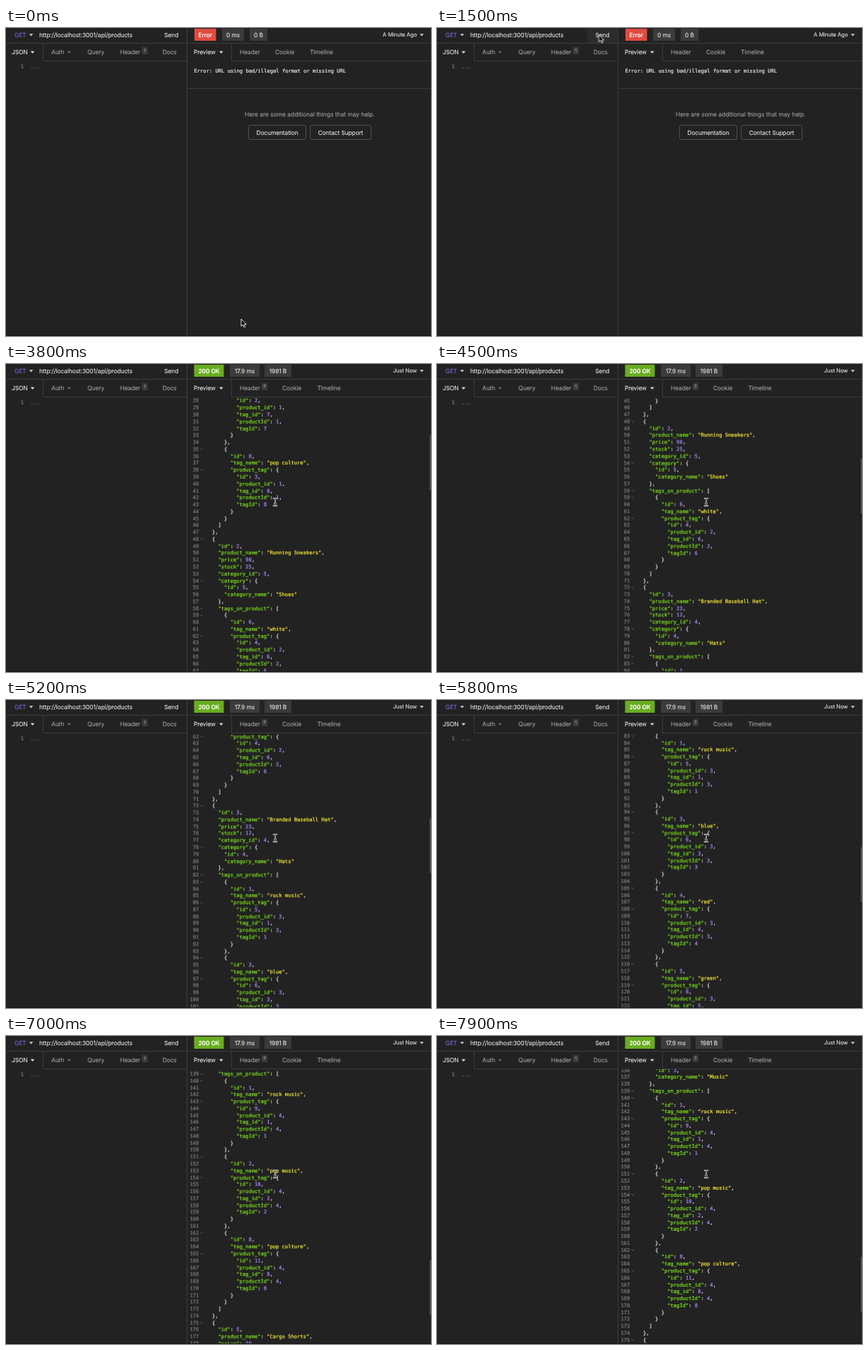
An HTML page that plays this animation: 600x435 px, repeating every 8000 ms.

```html
<!DOCTYPE html>
<html lang="en">
<head>
<meta charset="utf-8">
<title>API client</title>
<style>
  html, body { margin: 0; width: 100%; height: 100%; overflow: hidden; background: #222; }
  svg { display: block; width: 600px; height: 435px; }
  text {
    font: 8.4px Inter, "Open Sans", sans-serif;
    letter-spacing: -.01em;
    text-rendering: geometricPrecision;
    color: #e6e6e6;
  }
  /* a hairline stroke gives the text its slightly heavier smoothing */
  text, tspan { fill: currentColor; stroke: currentColor; stroke-width: .1px; }
  .mono, .mono text { font: 7.13px "DejaVu Sans Mono", "Liberation Mono", monospace; letter-spacing: 0; }
  .mono, .mono text, .mono tspan { stroke-width: .22px; }
  .dim { color: #a0a0a0; }
  .mid { text-anchor: middle; }
  .end { text-anchor: end; }
  .loose { letter-spacing: 0; }
  .strong { font-weight: 600; color: #fff; }
  .small { font-size: 7.7px; }
  .badge { font-size: 6px; color: #b0b0b0; }
  .pill { fill: #3b3b3b; }
  .line { fill: #3c3c3c; }
  .button { fill: none; stroke: #505050; }
  .num { color: #7c7c7c; }
  .key { color: #7fe31c; }
  .str { color: #fbec38; }
  .val { color: #a98dff; }
  .method { color: #7865d0; }

  #old, #new, #hover, #arrow, #beam { animation: 8s step-end infinite; }
  #old { animation-name: old; }
  #new { animation-name: new; }
  #hover { animation-name: hover; }
  #arrow { animation-name: arrow; }
  #beam { animation-name: beam; }
  #code { animation: scroll 8s linear infinite; }
  #thumb { animation: thumb 8s linear infinite; }
  #cursor { animation: move 8s ease-in-out infinite; }

  @keyframes old { 0% { opacity: 1 } 21.25% { opacity: .5 } 25%, 100% { opacity: 0 } }
  @keyframes new { 0% { opacity: 0 } 25%, 100% { opacity: 1 } }
  @keyframes hover { 0% { opacity: 0 } 10.5% { opacity: 1 } 35.5%, 100% { opacity: 0 } }
  @keyframes arrow { 0% { opacity: 1 } 37.5%, 100% { opacity: 0 } }
  @keyframes beam { 0% { opacity: 0 } 37.5%, 100% { opacity: 1 } }
  @keyframes move {
    0%, 1.5% { transform: translate(332px, 411px) }
    11.25%, 34.5% { transform: translate(228.5px, 9.5px) }
    40%, 100% { transform: translate(380px, 195px) }
  }
  @keyframes scroll {
    0%, 41% { transform: translateY(0) }
    47.5% { transform: translateY(-266px) }
    65% { transform: translateY(-598.3px) }
    80% { transform: translateY(-1010.3px) }
    87.5% { transform: translateY(-1349.3px) }
    98.75%, 100% { transform: translateY(-1325px) }
  }
  @keyframes thumb {
    0%, 41% { transform: translateY(0) }
    47.5% { transform: translateY(53.2px) }
    65% { transform: translateY(119.6px) }
    80% { transform: translateY(202px) }
    87.5% { transform: translateY(269.8px) }
    98.75%, 100% { transform: translateY(265px) }
  }
</style>
</head>
<body>
<svg viewBox="0 0 600 435">
  <defs>
    <path id="caret" d="M-2.8 -1.5H2.8L0 1.7Z"/>
    <path id="stem" d="M-2.3 -5.3Q0 -5.3 0 -3.6Q0 -5.3 2.3 -5.3M0 -3.6V3.6M-2.3 5.3Q0 5.3 0 3.6Q0 5.3 2.3 5.3M-1.2 1.6H1.2"/>
    <clipPath id="pane"><rect x="256" y="47" width="344" height="387"/></clipPath>
  </defs>
  <rect width="600" height="435" fill="#222"/>

  <!-- request pane -->
  <rect id="hover" x="212" width="43" height="21" fill="#2b2b2b"/>
  <text class="method" x="12" y="12.6">GET</text>
  <use href="#caret" x="35.5" y="9.7" fill="#ccc"/>
  <text x="47" y="12.6">http://localhost:3001/api/products</text>
  <text x="223.5" y="12.6">Send</text>
  <text x="8" y="37.2">JSON</text>
  <use href="#caret" x="37.5" y="34.2" fill="#ddd"/>
  <text class="dim" x="64" y="37.2">Auth</text>
  <use href="#caret" x="89" y="34.2" fill="#666"/>
  <text class="dim" x="115" y="37.2">Query</text>
  <text class="dim" x="161" y="37.2">Header</text>
  <rect class="pill" x="192" y="27" width="8" height="10" rx="1"/>
  <text class="badge mid" x="196" y="34.2">1</text>
  <text class="dim" x="221" y="37.2">Docs</text>
  <g class="mono">
    <text class="num end" x="25" y="56.7">1</text>
    <text class="num" x="34.5" y="56.7">...</text>
  </g>

  <!-- response pane -->
  <text x="265" y="37.2">Preview</text>
  <use href="#caret" x="303.8" y="34.2" fill="#ddd"/>
  <text class="dim" x="330" y="37.2">Header</text>
  <use href="#caret" x="587" y="9.7" fill="#ccc"/>

  <g id="old">
    <rect x="266" y="1" width="30.5" height="17" fill="#e14b40"/>
    <text class="strong mid" x="281.2" y="12.6" style="font-weight:500">Error</text>
    <rect class="pill" x="305" y="1" width="31" height="17"/>
    <text class="mid" x="320.5" y="12.6">0 ms</text>
    <rect class="pill" x="344" y="1" width="25" height="17"/>
    <text class="mid" x="356.5" y="12.6">0 B</text>
    <text class="small end" x="580" y="12.4">A Minute Ago</text>
    <text class="dim" x="380" y="37.2">Cookie</text>
    <text class="dim" x="429" y="37.2">Timeline</text>
    <text class="mono" x="265.5" y="63.2">Error: URL using bad/illegal format or missing URL</text>
    <rect class="line" x="256" y="85" width="344" height="1"/>
    <text class="dim mid loose" x="428.8" y="125.2">Here are some additional things that may help.</text>
    <rect class="button" x="342.5" y="137.5" width="81" height="20" rx="2"/>
    <text class="mid" x="383" y="151.2">Documentation</text>
    <rect class="button" x="429.5" y="137.5" width="86" height="20" rx="2"/>
    <text class="mid" x="472.3" y="151.2">Contact Support</text>
  </g>

  <g id="new">
    <rect x="265.5" y="1" width="42" height="17" fill="#69ad20"/>
    <text class="strong mid" x="286.5" y="12.6">200 OK</text>
    <rect class="pill" x="316" y="1" width="42" height="17"/>
    <text class="mid" x="337" y="12.6">17.9 ms</text>
    <rect class="pill" x="365" y="1" width="38" height="17"/>
    <text class="mid" x="384" y="12.6">1981 B</text>
    <text class="small end" x="580" y="12.4">Just Now</text>
    <rect class="pill" x="361" y="27" width="8" height="10" rx="1"/>
    <text class="badge mid" x="365" y="34.2">7</text>
    <text class="dim" x="390" y="37.2">Cookie</text>
    <text class="dim" x="439.5" y="37.2">Timeline</text>
    <g clip-path="url(#pane)"><g id="code" class="mono"></g></g>
    <rect id="thumb" x="598" y="47" width="2" height="77.5" fill="#4c4c4c"/>
  </g>

  <!-- borders -->
  <g class="line">
    <rect x="255" width="1" height="435"/>
    <rect y="21" width="600" height="1"/>
    <rect x="52" y="22" width="1" height="25"/>
    <rect x="52" y="46" width="203" height="1"/>
    <rect x="318" y="22" width="1" height="25"/>
    <rect x="318" y="46" width="282" height="1"/>
  </g>
  <rect y="434" width="600" height="1" fill="#151515"/>

  <g id="cursor">
    <path id="arrow" d="M0 0V10.2L2.4 8L4 11.6L5.7 10.9L4.2 7.4H7.2Z" fill="#000" stroke="#fff" stroke-width=".9"/>
    <g id="beam" fill="none" stroke-linecap="round">
      <use href="#stem" stroke="#fff" stroke-width="1.9"/>
      <use href="#stem" stroke="#111" stroke-width=".8"/>
    </g>
  </g>
</svg>
<script>
  const tags = ['', 'rock music', 'pop music', 'blue', 'red', 'green', 'white', 'gold', 'pop culture'];
  const categories = ['', 'Shirts', 'Shorts', 'Music', 'Hats', 'Shoes'];
  // name, price, stock, category, tags
  const items = [
    ['Plain T-Shirt', 15, 14, 1, [6, 7, 8]],
    ['Running Sneakers', 90, 25, 5, [6]],
    ['Branded Baseball Hat', 23, 12, 4, [1, 3, 4, 5]],
    ['Top 40 Music Compilation Vinyl Record', 13, 50, 3, [1, 2, 8]],
    ['Cargo Shorts', 30, 22, 2, [3]],
  ];

  let link = 0;
  const products = items.map(([product_name, price, stock, cat, ids], i) => ({
    id: i + 1, product_name, price, stock,
    category_id: cat,
    category: { id: cat, category_name: categories[cat] },
    tags_on_product: ids.map(id => ({
      id,
      tag_name: tags[id],
      product_tag: { id: ++link, product_id: i + 1, tag_id: id, productId: i + 1, tagId: id },
    })),
  }));

  const LINE = 9.77, CHAR = 4.293, LEFT = 282.3;
  const span = (cls, s) => `<tspan class="${cls}">${s}</tspan>`;
  const paint = s => s
    .replace(/("[^"]*")(:?)|(\d+)/g, (m, str, colon, n) =>
      n ? span('val', n) : span(colon ? 'key' : 'str', str) + colon);

  document.getElementById('code').innerHTML = JSON.stringify(products, null, 2)
    .split('\n')
    .map((row, i) => {
      const y = (56.7 + i * LINE).toFixed(2);
      const body = row.trimStart();
      const x = (LEFT + (row.length - body.length) * CHAR).toFixed(2);
      const fold = /[[{]$/.test(row)
        ? `<path d="M274.6 ${y - 3.2}l1.6 1.6l1.6 -1.6" fill="none" stroke="#777" stroke-width=".8"/>` : '';
      return `<text class="num end" x="272.4" y="${y}">${i + 1}</text>${fold}` +
        `<text x="${x}" y="${y}">${paint(body)}</text>`;
    })
    .join('');
</script>
</body>
</html>
```
